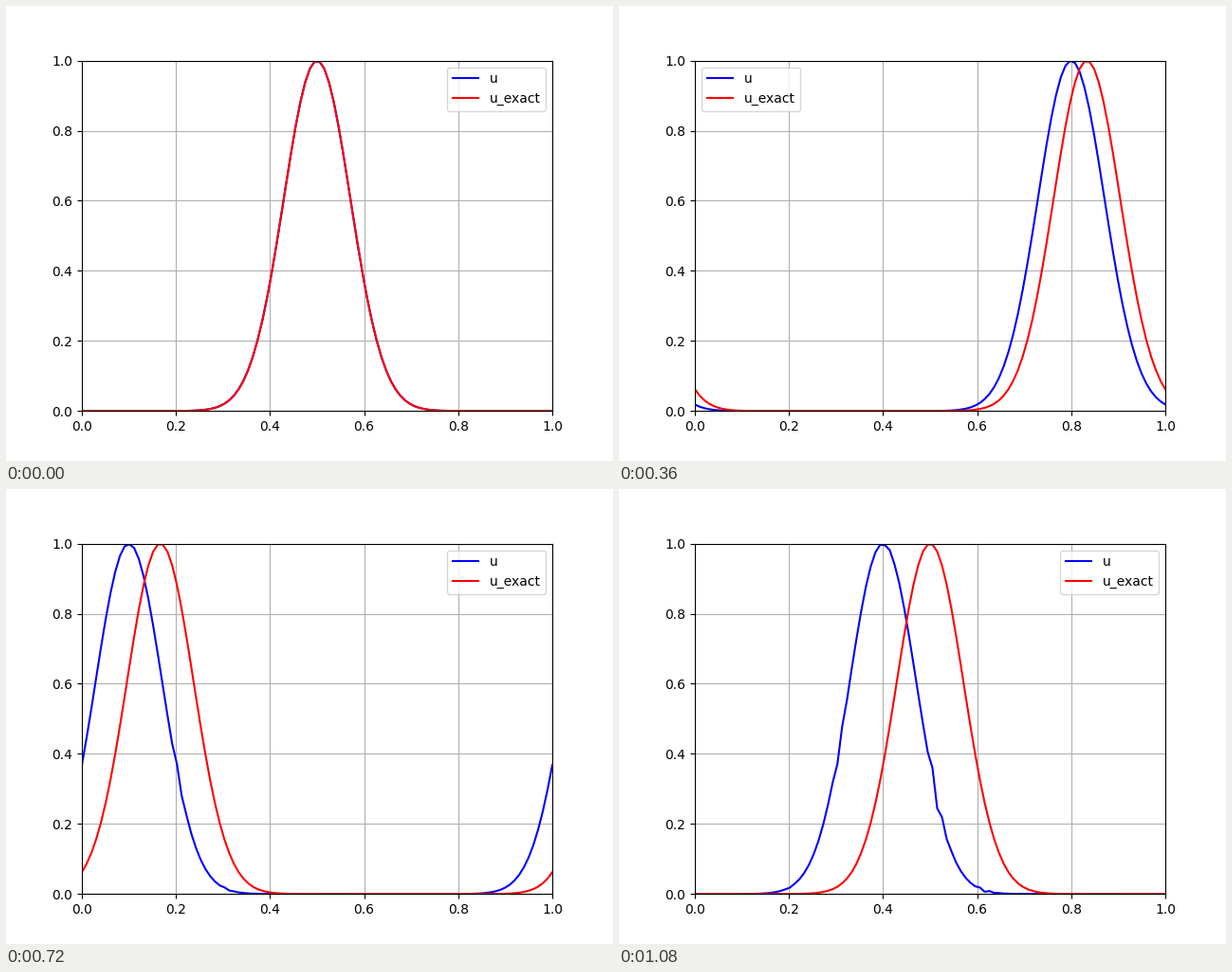
A matplotlib script for the animation above (1200 ms loop, 640 by 480 pixels).

```python
import matplotlib.pyplot as plt
import numpy as np
from matplotlib.animation import FuncAnimation

POINTS = 100
FRAMES = 10
STEP = 0.1

x = np.linspace(0, 1, POINTS)
cells = POINTS - 1


def exact(t):
    """Gaussian pulse carried round the unit interval at speed 1."""
    dist = (x - t) % 1 - 0.5
    return np.exp(-100 * dist**2)


def advect(u):
    """One upwind step: quadratic through the three cells behind the foot."""
    shift = int(np.ceil(STEP * cells))
    s = shift - STEP * cells
    k = (np.arange(POINTS) - shift) % cells
    return (
        (s + 1) * (s + 2) / 2 * u[k]
        - s * (s + 2) * u[k - 1]  # wraps onto the doubled end point
        + s * (s + 1) / 2 * u[(k - 2) % cells]
    )


history = [exact(0)]
for _ in range(FRAMES - 1):
    history.append(advect(history[-1]))

fig, ax = plt.subplots(figsize=(6.4, 4.8), dpi=100)


def draw(i):
    ax.clear()
    ax.plot(x, history[i], "b", label="u")
    ax.plot(x, exact(i / (FRAMES - 1)), "r", label="u_exact")
    ax.set(xlim=(0, 1), ylim=(0, 1))
    ax.grid(True)
    ax.legend(loc="best")


anim = FuncAnimation(fig, draw, frames=FRAMES, interval=120, repeat=True)
plt.show()
```
